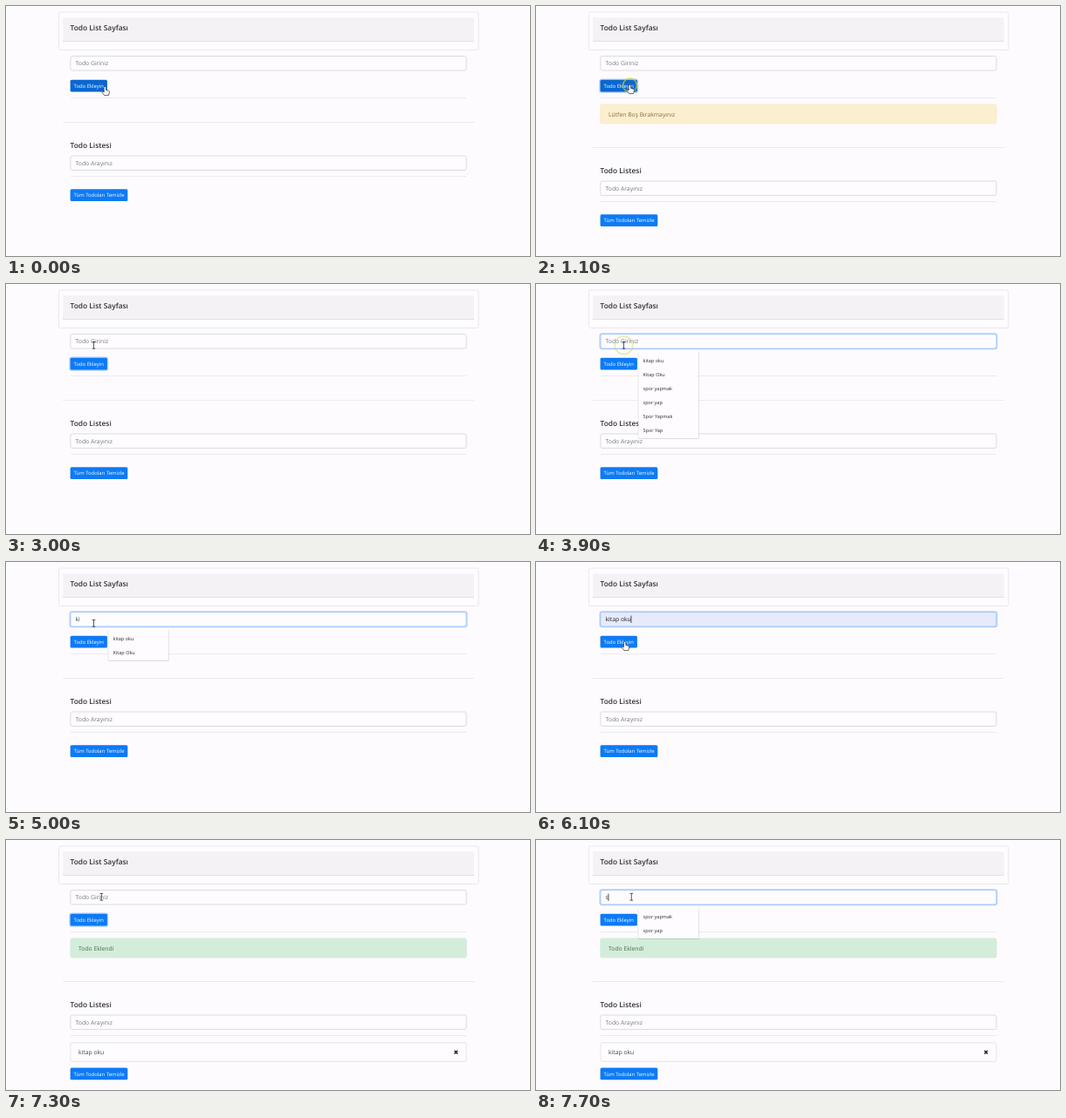
Animation, 600 px wide and 287 px high, one loop 8 s. Source, as an HTML page:

```html
<!DOCTYPE html>
<html lang="tr">
<head>
<meta charset="utf-8">
<title>Todo List</title>
<style>
html, body { margin: 0; width: 100%; height: 100%; overflow: hidden; background: #fdfbfe }
svg { display: block; width: 600px; height: 287px }
text { font: 6.8px "Open Sans", sans-serif; fill: #42484e; text-rendering: geometricPrecision }
.head { font-size: 8.4px; font-weight: 600; fill: #303236 }
.hint { fill: #767a80 }
.small { font-size: 5.9px; font-weight: 500; fill: #fff }
.box { fill: #fefcff; stroke: #d6d7dc; stroke-width: .9 }
.line { stroke: #ebe9ed; stroke-width: .9 }
.btn { fill: #0d7af5 }
.glow { fill: none; stroke: #2684f5; stroke-opacity: .33; stroke-width: 1.8 }
.menu text { font-size: 5.5px; fill: #2b2b2e }
.cursor { fill: #fff; stroke: #444; stroke-width: .8; stroke-linejoin: round }
</style>
</head>
<body>
<svg viewBox="0 0 600 287">
  <rect class="box" x="60.5" y="7" width="480.5" height="43.5" rx="2" style="stroke:#e8e6ea"/>
  <rect x="65" y="13.5" width="471" height="27" fill="#f4f2f5"/>
  <path class="line" d="M65 40.5H536" style="stroke:#e0dee2"/>
  <text class="head" x="73.5" y="27.5">Todo List Sayfası</text>

  <rect id="inputGlow" class="glow" x="73.4" y="57.2" width="454.2" height="17.2" rx="2.4"/>
  <rect id="input" class="box" x="73.9" y="57.6" width="453.2" height="16.4" rx="2"/>
  <text id="value" x="79.5" y="68.4"></text>
  <path id="caret" stroke="#222" stroke-width=".8"/>

  <rect id="addGlow" class="glow" x="73.2" y="84.5" width="43.1" height="14.4" rx="2"/>
  <rect id="add" class="btn" x="73.6" y="84.8" width="42.3" height="13.8" rx="1.5"/>
  <text class="small" x="77.6" y="94">Todo Ekleyin</text>
  <path class="line" d="M74 105.5H527"/>

  <g id="alert">
    <rect id="alertBox" x="73.8" y="113" width="453.4" height="22" rx="2" stroke-width=".6"/>
    <text id="alertText" x="83" y="126.7"></text>
  </g>

  <g id="lower">
    <path class="line" d="M65 133.5H536"/>
    <text class="head" x="73.5" y="162.8">Todo Listesi</text>
    <rect class="box" x="73.9" y="172" width="453.2" height="16.4" rx="2"/>
    <text class="hint" x="79.5" y="182.8">Todo Arayınız</text>
    <path class="line" d="M74 195.5H527"/>
    <g id="item">
      <rect class="box" x="73.9" y="203.8" width="453.2" height="21.4" rx="2" style="stroke:#e2e1e5"/>
      <text x="83" y="217">kitap oku</text>
      <path d="M513.5 212.8l3.6 3.8m0-3.8l-3.6 3.8" stroke="#222" stroke-width="1.5"/>
    </g>
    <g id="clear">
      <rect class="btn" x="73.6" y="210.2" width="65.7" height="13.8" rx="1.5"/>
      <text class="small" x="77.6" y="219.4">Tüm Todoları Temizle</text>
    </g>
  </g>

  <g id="menu" class="menu">
    <rect id="menuShade" x="116.7" y="78" width="70" rx="1" fill="#000" opacity=".13"/>
    <rect id="menuBox" x="117.3" y="77" width="68.6" fill="#fefcff"/>
    <rect id="menuHover" x="117.3" y="80" width="68.6" height="16" fill="#eeedf0"/>
    <g id="rows"></g>
  </g>

  <circle id="ring" fill="none" stroke="#d3d02c" stroke-width="1.6"/>
  <g id="cursor">
    <path id="hand" class="cursor" d="M-1.3 .2Q-.2-1.4 1 .2V3.4L4 4.3Q5.1 4.7 4.9 6L4 9.6H-.9L-3.6 6Q-3.8 4.7-2.6 5L-1.3 6Z"/>
    <path id="arrow" class="cursor" d="M0 0V10.2L2.3 8.2 3.8 11.5 5.3 10.8 3.9 7.6H7Z"/>
    <path id="beam" d="M-1.8-3.9H1.8M0-3.9V3.9M-1.8 3.9H1.8" stroke="#333" stroke-width=".8"/>
  </g>
</svg>
<script>
const LOOP = 8000, STEP = 100;
const $ = id => document.getElementById(id);
const set = (id, attrs) => { for (const k in attrs) $(id).setAttribute(k, attrs[k]); };
const show = (id, on) => { $(id).style.display = on ? '' : 'none'; };

// time, x, y of the pointer's hot spot
const path = [
  [0, 113.5, 93], [200, 107.5, 91], [1900, 107.5, 91], [2400, 100.5, 69], [2600, 100.5, 69],
  [2700, 100.5, 70.3], [5000, 100.5, 70.3], [5600, 130, 92], [6000, 130, 92], [6100, 101.8, 92],
  [6400, 97, 89], [6700, 97, 89], [6800, 102, 92], [7300, 109.3, 65.3]
];
const clicks = [1000, 3700, 5700, 6700, 7400];
const all = ['kitap oku', 'Kitap Oku', 'spor yapmak', 'spor yap', 'Spor Yapmak', 'Spor Yap'];

// start time and value; the latest one holds
const typed = [[0, ''], [4200, 'k'], [5000, 'ki'], [5500, 'kitap oku'], [6700, ''], [7500, 's']];
const menus = [[0, []], [3900, all], [4200, all.slice(0, 2)], [5900, []], [7500, all.slice(2, 4)]];
const alerts = [
  [0, null],
  [1000, ['Lütfen Boş Bırakmayınız', '#fcefcf', '#f8e8bd', '#85703a']],
  [3000, null],
  [6700, ['Todo Eklendi', '#d4edda', '#c6e6cf', '#4a6b55']]
];
const latest = (list, t) => list.filter(e => e[0] <= t).pop()[1];

function pointer(t) {
  const i = path.findIndex(p => p[0] > t);
  if (i < 0) return path[path.length - 1].slice(1);
  if (i === 0) return path[0].slice(1);
  const [a, b] = [path[i - 1], path[i]], k = (t - a[0]) / (b[0] - a[0]);
  return [a[1] + (b[1] - a[1]) * k, a[2] + (b[2] - a[2]) * k];
}
const overAdd = ([x, y]) => x < 116 && y > 85 && y < 99;

function drawMenu(items, hover) {
  show('menu', items.length);
  const h = items.length * 16 + 4;
  set('menuBox', { height: h });
  set('menuShade', { height: h });
  show('menuHover', hover);
  $('rows').innerHTML = items.map((s, i) => `<text x="122.6" y="${90 + 16 * i}">${s}</text>`).join('');
}

function draw(t) {
  const pos = pointer(t), [x, y] = pos;
  const focus = t >= 3700 && t < 6700 || t >= 7400;
  const filled = t >= 5500 && t < 6700;
  const text = latest(typed, t), alert = latest(alerts, t);

  show('inputGlow', focus);
  $('input').style.stroke = focus ? '#9fc3f7' : '';
  $('input').style.fill = filled ? '#e7eafb' : '';
  $('value').textContent = text || 'Todo Giriniz';
  $('value').setAttribute('class', text ? '' : 'hint');
  $('value').style.fill = filled ? '#222' : '';
  show('caret', t >= 5900 && t < 6700 || t >= 7500);
  const end = 79.5 + $('value').getComputedTextLength() + .2;
  set('caret', { d: `M${end} 61.6V70` });

  show('addGlow', t >= 1000 && t < 3700 || t >= 6700 && t < 7400);
  $('add').style.fill = overAdd(pointer(t - STEP)) ? '#0967d0' : '';

  show('alert', alert);
  if (alert) {
    set('alertBox', { fill: alert[1], stroke: alert[2] });
    $('alertText').textContent = alert[0];
    $('alertText').style.fill = alert[3];
  }
  const done = t >= 6700;
  set('lower', { transform: `translate(0 ${alert ? 29 : 0})` });
  show('item', done);
  set('clear', { transform: `translate(0 ${done ? 22.2 : 0})` });

  drawMenu(latest(menus, t), t >= 5500 && t < 5900);

  const click = clicks.find(c => t >= c && t < c + 300);
  show('ring', click !== undefined);
  if (click !== undefined) {
    const [cx, cy] = pointer(click), age = (t - click) / STEP;
    set('ring', { cx, cy, r: 5.5 + 2.4 * age, opacity: .9 - .25 * age });
  }

  set('cursor', { transform: `translate(${x} ${y})` });
  const kind = y < 75 ? 'beam' : overAdd(pos) ? 'hand' : 'arrow';
  for (const k of ['hand', 'arrow', 'beam']) show(k, k === kind);
}

function tick(now) {
  draw(Math.floor(now % LOOP / STEP) * STEP);
  requestAnimationFrame(tick);
}
tick(0);
</script>
</body>
</html>
```
